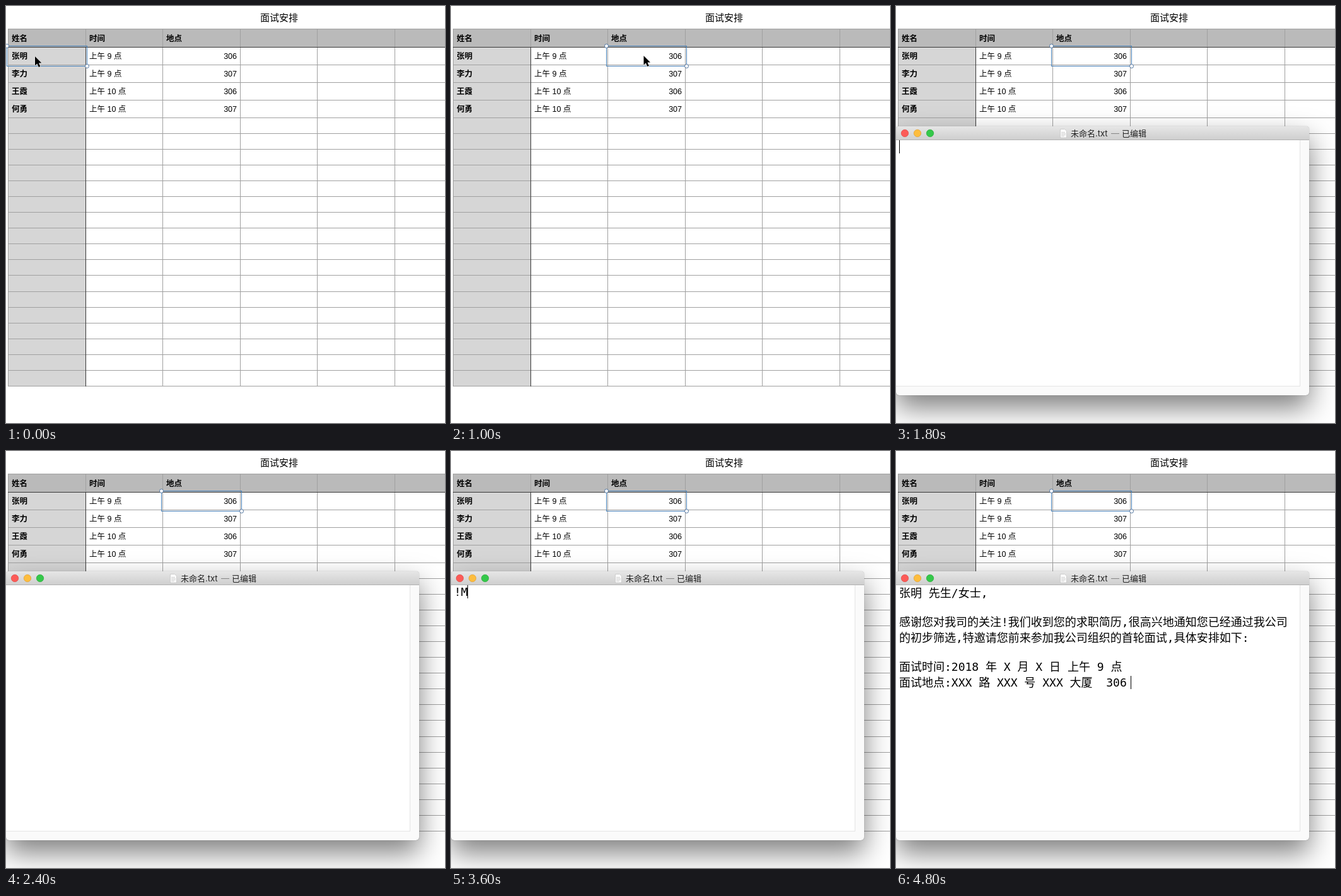
Animation, 696 px wide and 662 px high, one loop 5.3 s. Source, as an HTML page:

```html
<!DOCTYPE html>
<html lang="zh-CN">
<head>
<meta charset="utf-8">
<title>面试安排</title>
<style>
  html, body { margin: 0; width: 100%; height: 100%; overflow: hidden; background: #fff; }
  body { position: relative; }
  svg { position: absolute; left: 0; top: 0; display: block; overflow: hidden; }
  text { font-family: "Liberation Sans", "Noto Sans CJK SC", "Noto Sans CJK", sans-serif; fill: #000; white-space: pre; }
  .cell { font-size: 12.5px; }
  .bold { font-weight: 700; }
  .title { font-size: 15px; }
  .bar { font: 13px Inter, "Noto Sans CJK SC", "Noto Sans CJK", sans-serif; fill: #222; }
  .body { font: 18px "DejaVu Sans Mono", "Noto Sans CJK SC", "Noto Sans CJK", monospace; }
  #win {
    position: absolute; left: 0; top: 191px; width: 655px; height: 427px;
    border-radius: 5px; background: #fafafa;
    box-shadow: 0 20px 44px rgba(0,0,0,.5), 0 0 1px rgba(0,0,0,.55);
  }
  #win .head {
    position: absolute; left: 0; top: 0; width: 100%; height: 22px; box-sizing: border-box;
    border-radius: 5px 5px 0 0; border-bottom: 1px solid #b1b1b1;
    background: linear-gradient(#e6e6e6, #cfcfcf);
  }
  #win .page {
    position: absolute; left: 0; top: 22px; width: 640px; height: 390px;
    background: #fff; border: solid #e4e4e4; border-width: 0 1px 1px 0;
  }
</style>
</head>
<body>
<svg width="696" height="662" viewBox="0 0 696 662">
  <g id="sheet" shape-rendering="crispEdges"></g>
  <g id="labels"></g>
  <g id="sel" fill="none" stroke="#4580b8">
    <rect y="63.5" height="32"/>
    <circle cy="63.5" r="3" fill="#fff" stroke="#4a6f9c"/>
    <circle cy="95.5" r="3" fill="#fff" stroke="#4a6f9c"/>
  </g>
  <path id="mouse" d="M0 0V14.5L3.4 11.5L5.8 17L8.4 15.9L6 10.5H10.5Z" stroke="#fff" stroke-width="1" paint-order="stroke"/>
</svg>
<div id="win">
  <div class="head"></div>
  <div class="page"></div>
  <svg width="655" height="427" viewBox="0 191 655 427">
    <circle cx="14" cy="202" r="5.7" fill="#fc5b57" stroke="#df4744" stroke-width=".7"/>
    <circle cx="34" cy="202" r="5.7" fill="#fdbd3e" stroke="#de9f34" stroke-width=".7"/>
    <circle cx="54" cy="202" r="5.7" fill="#34c84a" stroke="#27aa35" stroke-width=".7"/>
    <path d="M260.5 195.5h7l3 3v10.500h-10z" fill="#fff" stroke="#c4c4c4" stroke-width=".8"/>
    <path d="M262 200.500h6M262 202.500h7M262 204.500h7M262 206.500h5" stroke="#bbb" stroke-width=".7"/>
    <text class="bar" x="277" y="207">未命名.txt</text>
    <text class="bar" x="341" y="207" style="fill:#888">—</text>
    <text class="bar" x="358" y="207">已编辑</text>
    <g id="note"></g>
    <rect id="caret" width="1" height="21" shape-rendering="crispEdges"/>
  </svg>
</div>
<script>
const $ = id => document.getElementById(id);
const LOOP = 5300, STEP = 200, LAST = 24;
const cols = [3, 126, 248, 371, 493, 616];
const rows = [36, 65, 93, 121, 149, 177];
for (let k = 1; k < 18; k++) rows.push(177 + 25 * k + (k > 10 ? 1 : 0));
const bottom = rows[rows.length - 1];

function add(parent, tag, attrs, content) {
  const el = document.createElementNS("http://www.w3.org/2000/svg", tag);
  for (const key in attrs) el.setAttribute(key, attrs[key]);
  if (content) el.textContent = content;
  return parent.appendChild(el);
}
const box = (x, y, width, height, fill) => add($("sheet"), "rect", { x, y, width, height, fill });
const label = (x, y, cls, s, anchor = "start") =>
  add($("labels"), "text", { x, y, class: cls, "text-anchor": anchor }, s);

// Sheet
box(3, 36, 693, 29, "#bababa");
box(3, 65, 123, bottom - 65, "#d6d6d6");
rows.forEach(y => box(3, y, 693, 1, "#a0a0a0"));
cols.forEach(x => box(x, 36, 1, bottom - 35, "#a0a0a0"));
box(3, 65, 693, 1, "#383838");
box(126, 65, 1, bottom - 64, "#383838");

label(403, 23.5, "title", "面试安排");
["姓名", "时间", "地点"].forEach((s, i) => label(cols[i] + 6, 55.5, "cell bold", s));
[["张明", 9, 306], ["李力", 9, 307], ["王霞", 10, 306], ["何勇", 10, 307]].forEach(([name, hour, room], i) => {
  const y = 84 + 28 * i;
  label(9, y, "cell bold", name);
  label(132, y, "cell", `上午 ${hour} 点`);
  label(366, y - 0.5, "cell", room, "end");
});

// Expanded letter: [baseline, text]
const letter = [
  [232, "张明 先生/女士,"],
  [278, "感谢您对我司的关注!我们收到您的求职简历,很高兴地通知您已经通过我公司"],
  [303, "的初步筛选,特邀请您前来参加我公司组织的首轮面试,具体安排如下:"],
  [349, "面试时间:2018 年 X 月 X 日 上午 9 点"],
  [374, "面试地点:XXX 路 XXX 号 XXX 大厦  306"]
].map(([y, s]) => add($("note"), "text", { x: 5, y, class: "body" },
  s.replace(/,/g, ",").replace(/!/g, "!").replace(/:/g, ":").replace(/ /g, "\u00a0")));
const typed = add($("note"), "text", { x: 5, y: 230, class: "body" });

// Typing steps from 1800 ms on; "|" marks a visible caret
const typing = ["|", "", "|", "", "!|", "!F|", "!F", "!|", "!M", "!M|", "!M", "!M|", "!M", "!M|", "!Mf|"];
const TYPE_FROM = 9;

const show = (el, on) => { el.style.visibility = on ? "visible" : "hidden"; };

function select(col) {
  const left = cols[col] - 1.5, right = cols[col + 1] + 2.5;
  const [frame, start, end] = $("sel").children;
  frame.setAttribute("x", left);
  frame.setAttribute("width", right - left);
  start.setAttribute("cx", left);
  end.setAttribute("cx", right);
}

function pointer(n) {
  const [x, y] = n < 1 ? [46, 80] : n < 2 ? [78, 97] : n < 4 ? [145, 80.5] : [305.5, 79];
  $("mouse").setAttribute("transform", `translate(${x} ${y})`);
  show($("mouse"), n < 7);
}

function write(n) {
  const done = n >= LAST;
  const s = done ? "" : typing[n - TYPE_FROM] || "";
  const plain = s.replace("|", "");
  typed.textContent = plain;
  letter.forEach(el => { el.style.display = done ? "" : "none"; });
  $("caret").setAttribute("x", done ? 372 : Math.floor(5 + 10.8 * plain.length));
  $("caret").setAttribute("y", done ? 357 : 213);
  $("caret").style.display = done || s.endsWith("|") ? "" : "none";
}

let last = -1;
function draw() {
  const n = Math.min(LAST, Math.floor(performance.now() % LOOP / STEP));
  if (n !== last) {
    last = n;
    select(n < 2 ? 0 : n < 5 ? 1 : 2);
    pointer(n);
    show($("win"), n >= TYPE_FROM);
    write(n);
  }
  requestAnimationFrame(draw);
}
draw();
</script>
</body>
</html>
```
